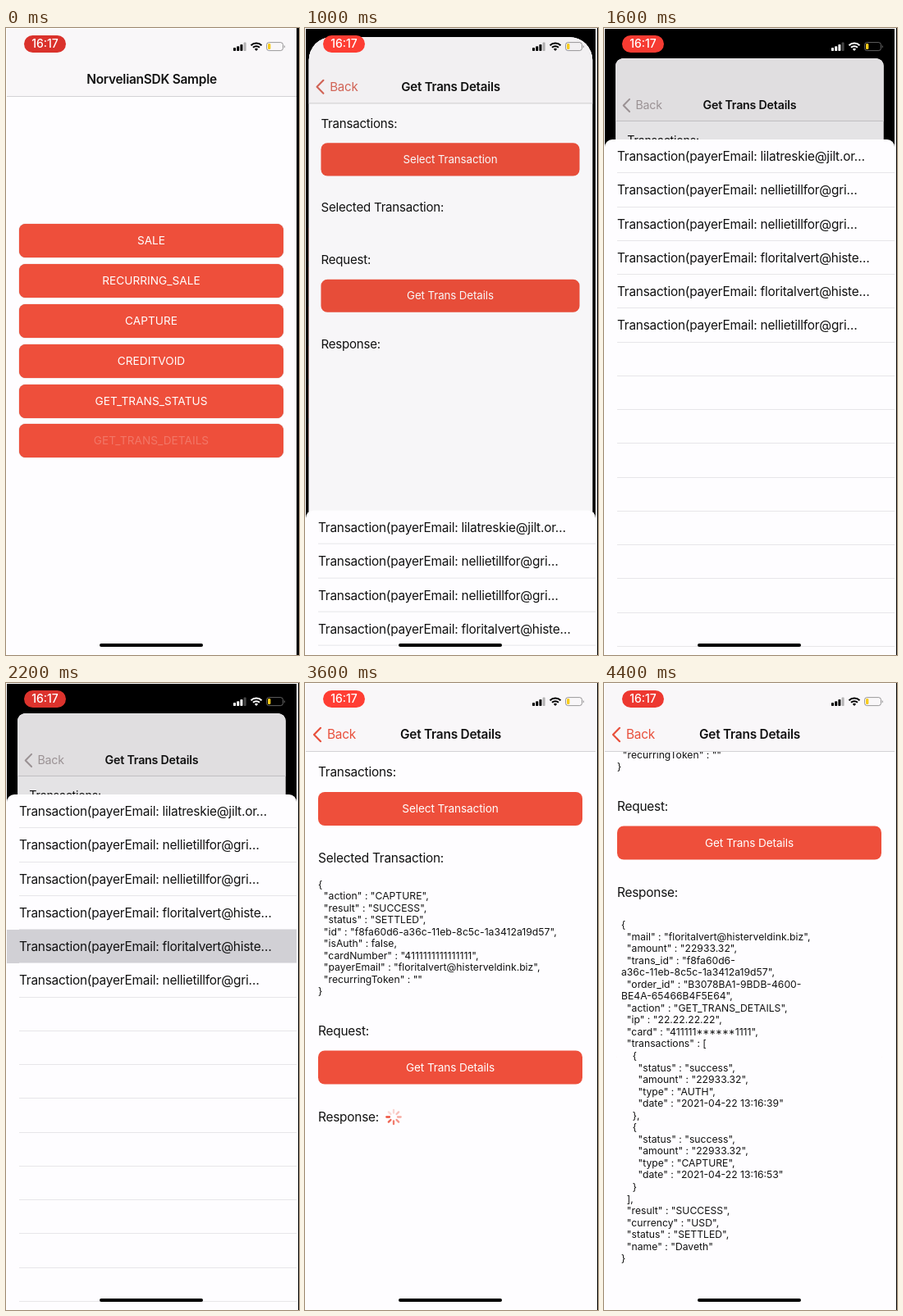
These frames come from a looping animation (357x765 px, 4500 ms). An HTML page:

```html
<!DOCTYPE html>
<html lang="en">
<head>
<meta charset="utf-8">
<title>Payment SDK sample</title>
<style>
  html, body { margin: 0; width: 100%; height: 100%; overflow: hidden; background: #fff; }
  body { font: 15.4px/20px Inter, "Liberation Sans", sans-serif; letter-spacing: -.22px; color: #111; }
  div, pre, svg { position: absolute; margin: 0; }
  pre { font: 12.2px/14.55px Inter, "Liberation Sans", sans-serif; letter-spacing: 0; white-space: pre; }
  #stage { left: 0; top: 0; width: 357px; height: 765px; overflow: hidden; background: #fff; }
  #edge { left: 356px; top: 0; width: 1px; height: 765px; background: #000; }
  .first #edge { left: 354px; width: 3px; }
  #screen, #base, #dim, .page { left: 0; top: 0; width: 357px; height: 765px; }
  #screen { background: #000; clip-path: inset(1px 3px 1px 1px); }
  #base { background: #fefdff; transform-origin: 177px 0; }
  #dim { background: #000; }
  .page { background: #fefdff; }
  .text { left: 16px; white-space: pre; }
  .btn {
    left: 16px; width: 322px; height: 41px; border-radius: 8px; background: #ee4f3b;
    color: #fff; font-size: 13.6px; line-height: 41px; letter-spacing: -.1px; text-align: center;
  }
  #menu .btn { letter-spacing: .06px; box-shadow: 0 0 1px #a8483c; }
  #shade { inset: 0; background: #000; }
  #nav { left: 0; top: 0; width: 357px; height: 83px; background: #f9f7f9; border-bottom: 1px solid #d3d2d5; }
  .title { left: 0; top: 53px; width: 355px; text-align: center; font-weight: 600; }
  #back { left: 27px; top: 53px; }
  #chevron { left: 9px; top: 53px; }
  #sheet {
    left: 1px; top: 136px; width: 353px; height: 640px; overflow: hidden;
    border-radius: 9px 9px 0 0; background: #fefdff;
  }
  .row { left: 0; width: 353px; height: 41.25px; line-height: 41.25px; text-indent: 15px; white-space: pre; }
  .row::after { content: ""; position: absolute; left: 15px; right: 0; bottom: 0; height: 1px; background: #e7e6e9; }
  .row.on { background: #d1d0d5; }
  #pill {
    left: 22px; top: 9px; width: 51px; height: 20.5px; border-radius: 10.5px;
    color: #fff; font-size: 14px; font-weight: 500; letter-spacing: 0; text-align: center;
  }
  #icons { left: 276px; top: 15px; }
  #home { left: 114px; top: 751px; width: 126px; height: 4px; border-radius: 2px; background: #000; }
  #spinner { left: 97px; top: 373px; }
</style>
</head>
<body>
<div id="stage">
  <div id="edge"></div>
  <div id="screen">
    <div id="base">
      <div id="menu" class="page"></div>
      <div id="detail" class="page">
        <div id="scroll">
          <div class="text" style="top:98.5px">Transactions:</div>
          <div id="select" class="btn" style="top:133px"><span>Select Transaction</span></div>
          <div class="text" style="top:204px">Selected Transaction:</div>
          <pre id="chosen" style="left:16px;top:238.5px">{
  "action" : "CAPTURE",
  "result" : "SUCCESS",
  "status" : "SETTLED",
  "id" : "f8fa60d6-a36c-11eb-8c5c-1a3412a19d57",
  "isAuth" : false,
  "cardNumber" : "4111111111111111",
  "payerEmail" : "floritalvert@histerveldink.biz",
  "recurringToken" : ""
}</pre>
          <div id="lower">
            <div class="text" style="top:268.5px">Request:</div>
            <div id="fetch" class="btn" style="top:302.5px"><span>Get Trans Details</span></div>
            <div class="text" style="top:373.5px">Response:</div>
            <svg id="spinner" width="22" height="22" viewBox="-11 -11 22 22"></svg>
            <pre id="response" style="left:21px;top:416px">{
  "mail" : "floritalvert@histerveldink.biz",
  "amount" : "22933.32",
  "trans_id" : "f8fa60d6-
a36c-11eb-8c5c-1a3412a19d57",
  "order_id" : "B3078BA1-9BDB-4600-
BE4A-65466B4F5E64",
  "action" : "GET_TRANS_DETAILS",
  "ip" : "22.22.22.22",
  "card" : "411111******1111",
  "transactions" : [
    {
      "status" : "success",
      "amount" : "22933.32",
      "type" : "AUTH",
      "date" : "2021-04-22 13:16:39"
    },
    {
      "status" : "success",
      "amount" : "22933.32",
      "type" : "CAPTURE",
      "date" : "2021-04-22 13:16:53"
    }
  ],
  "result" : "SUCCESS",
  "currency" : "USD",
  "status" : "SETTLED",
  "name" : "Daveth"
}</pre>
          </div>
        </div>
      </div>
      <div id="nav">
        <div id="oldTitle" class="title">NorvelianSDK Sample</div>
        <div id="newTitle" class="title">Get Trans Details</div>
        <svg id="chevron" width="12" height="20" fill="none" stroke="currentColor" stroke-width="2.2" stroke-linecap="round" stroke-linejoin="round"><path d="M10 1.8 2 10l8 8.2"/></svg>
        <div id="back">Back</div>
      </div>
      <div id="dim"></div>
    </div>
    <div id="sheet"></div>
    <div id="pill">16:17</div>
    <svg id="icons" width="66" height="16" fill="currentColor">
      <rect x="1" y="9" width="3" height="4" rx=".8"/>
      <rect x="5.2" y="7.2" width="3" height="5.8" rx=".8"/>
      <rect x="9.4" y="5" width="3" height="8" rx=".8"/>
      <rect x="13.6" y="2.6" width="3" height="10.4" rx=".8" opacity=".28"/>
      <g fill="none" stroke="currentColor" stroke-width="2">
        <path d="M22.5 6.2a9.2 9.2 0 0 1 13 0M25 8.8a5.7 5.7 0 0 1 8 0"/>
      </g>
      <path d="M26.9 10.7a3 3 0 0 1 4.2 0L29 13z"/>
      <rect x="41.5" y="2.6" width="20" height="10" rx="3" fill="none" stroke="currentColor" opacity=".38"/>
      <path d="M62.8 6v3.4a1.8 1.8 0 0 0 0-3.4" opacity=".4"/>
      <rect x="43" y="4.1" width="3.4" height="7" rx="1.4" fill="#f8cc1c"/>
    </svg>
    <div id="home"></div>
  </div>
</div>
<script>
const LOOP = 4500, STEP = 100, WIDTH = 353;
const $ = id => document.getElementById(id);
const clamp = v => Math.min(1, Math.max(0, v));
const mix = (a, b, p) => a + (b - a) * p;
const show = (id, on) => { $(id).style.visibility = on ? "visible" : "hidden"; };
const move = (id, x, y = 0) => { $(id).style.transform = `translate(${x}px, ${y}px)`; };
const fade = (id, v) => { $(id).style.opacity = v; };
const rgb = (a, b, p) => `rgb(${a.map((v, i) => Math.round(mix(v, b[i], p)))})`;

// Critically damped spring from 0 to 1, starting at time `start`.
function spring(t, start, rate) {
  const x = Math.max(0, t - start) / 1000 * rate;
  const left = (1 + x) * Math.exp(-x);
  return left < .002 ? 1 : 1 - left;
}

const actions = ["SALE", "RECURRING_SALE", "CAPTURE", "CREDITVOID", "GET_TRANS_STATUS", "GET_TRANS_DETAILS"];
$("menu").innerHTML = actions.map((name, i) =>
  `<div class="btn" style="top:${239.3 + i * 48.8}px"><span>${name}</span></div>`).join("") +
  '<div id="shade"></div>';

const [first, second, third] = ["lilatreskie@jilt.or", "nellietillfor@gri", "floritalvert@histe"];
const payers = [first, second, second, third, third, second];
$("sheet").innerHTML = Array.from({ length: 15 }, (_, i) =>
  `<div class="row" style="top:${i * 41.25}px">${payers[i] ? `Transaction(payerEmail: ${payers[i]}…` : ""}</div>`).join("");

$("spinner").innerHTML = Array.from({ length: 8 }, (_, i) =>
  `<path d="M0-5V-8.7" stroke="#ee4f3b" stroke-width="2.3" stroke-linecap="round" transform="rotate(${i * 45})"/>`).join("");

const lastAction = $("menu").querySelectorAll("span")[5];
const pickedRow = $("sheet").children[4];
const spokes = [...$("spinner").children];

function drawPush(t) {
  const p = spring(t, 50, 14.3);
  move("menu", -.3 * WIDTH * p);
  move("detail", WIDTH * (1 - p));
  fade("shade", .1 * p);
  move("oldTitle", -66 * p);
  fade("oldTitle", clamp(1 - p * 1.03));
  move("newTitle", 165 * (1 - p));
  fade("newTitle", p);
  move("back", 66 * (1 - p));
  fade("back", p);
  fade("chevron", p);
  lastAction.style.opacity = t < 100 ? .22 : .5;
}

function drawSheet(t) {
  const p = spring(t, 927, 14.3) * (1 - spring(t, 2210, 18));
  const radius = p > 0 ? mix(36, 9.5, p) : 0;
  const base = $("base").style;
  base.transform = `translateY(${36.3 * p}px) scale(${1 - .0765 * p})`;
  base.clipPath = `inset(1px 3px 1px 1px round ${radius}px)`;
  fade("dim", .1 * p);
  move("sheet", 0, 629 * (1 - p));
  show("sheet", p > 0);
  pickedRow.classList.toggle("on", t >= 2100);

  const tint = rgb([232, 80, 60], [172, 162, 165], p);
  $("back").style.color = $("chevron").style.color = tint;
  const light = clamp((t - 1150) / 300) * (1 - clamp((t - 2250) / 300));
  $("icons").style.color = rgb([0, 0, 0], [255, 255, 255], light);
}

function drawDetail(t) {
  const chosen = t >= 2250;
  show("chosen", chosen);
  move("lower", 0, chosen ? 145.5 : 0);
  $("select").firstChild.style.opacity = t >= 800 && t < 1000 ? .3 : 1;
  $("fetch").firstChild.style.opacity = t >= 3200 && t < 3400 ? .3 : 1;
  show("spinner", t >= 3300 && t < 3700);
  show("response", t >= 3700);
  const head = 6 + Math.round((t - 3600) / 100) + 80;
  spokes.forEach((spoke, i) => {
    spoke.style.opacity = Math.max(.2, 1 - (head - i) % 8 * .13);
  });
  move("scroll", 0, -Math.round(274 * spring(t, 3800, 20)));
}

function draw(t) {
  $("stage").classList.toggle("first", t < 100);
  drawPush(t);
  drawSheet(t);
  drawDetail(t);
  const pulse = .5 - .5 * Math.cos(Math.min(t, 4200) / 2400 * 2 * Math.PI);
  $("pill").style.background = rgb([218, 50, 44], [255, 62, 52], pulse);
}

const start = performance.now();
function tick() {
  const t = (performance.now() - start) % LOOP;
  draw(Math.floor(t / STEP) * STEP);
  requestAnimationFrame(tick);
}
tick();
</script>
</body>
</html>
```
